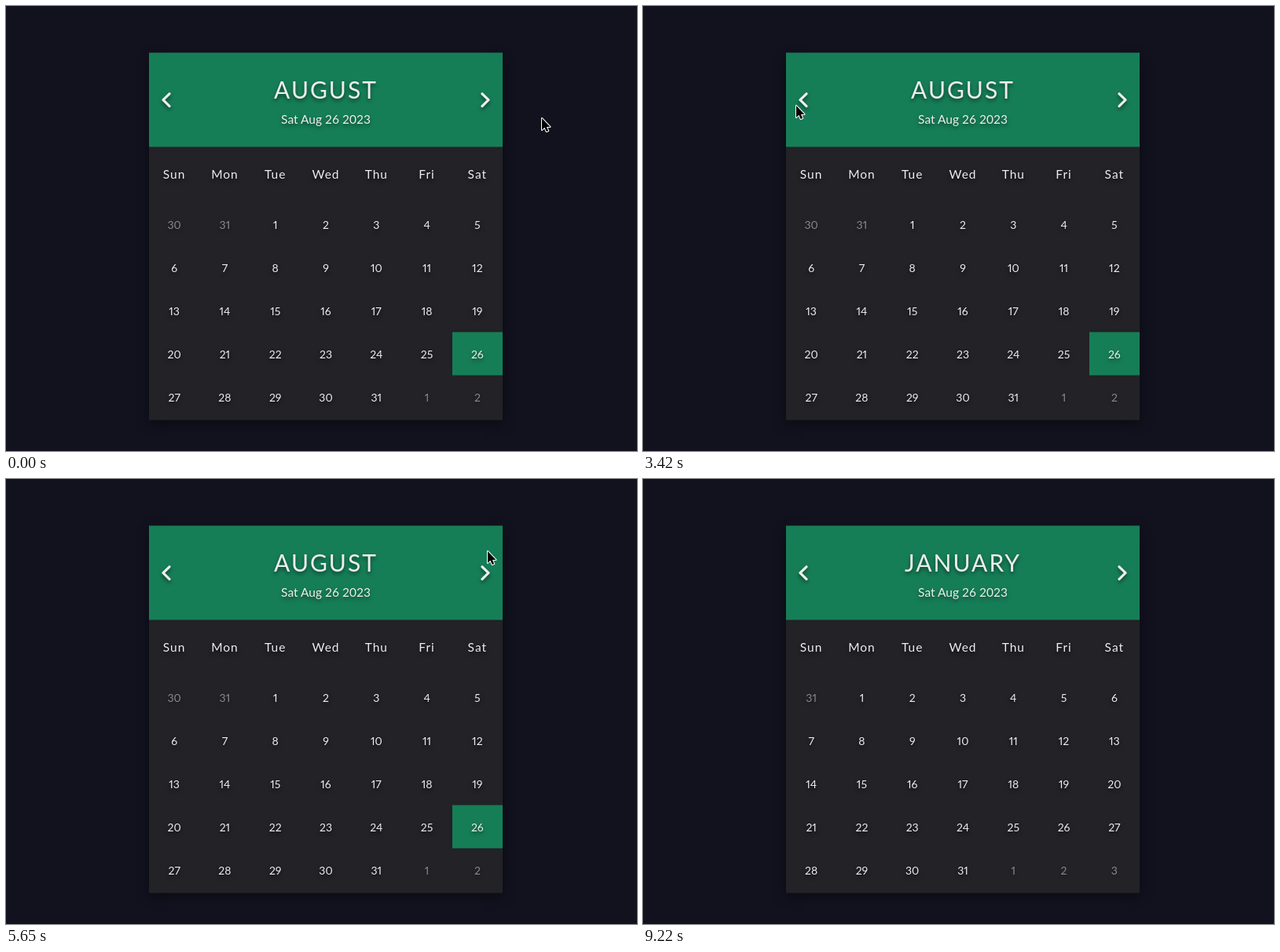
An HTML page that plays this animation: 803x567 px, repeating every 9.82 s.

```html
<!DOCTYPE html>
<html lang="en">
<head>
<meta charset="utf-8">
<title>Calendar</title>
<style>
  html, body { margin: 0; width: 100%; height: 100%; overflow: hidden; background: #12121f; }
  body { position: relative; font: 15.5px Lato, "Open Sans", sans-serif; color: #eee; }
  #calendar {
    position: absolute; left: 182px; top: 0; width: 450px;
    background: #222227; box-shadow: 0 5px 15px rgba(0, 0, 0, .4);
    text-shadow: 0 3px 5px rgba(0, 0, 0, .5);
  }
  header { position: relative; height: 120px; background: #167e56; text-align: center; }
  header div { position: absolute; width: 100%; line-height: 36px; }
  #title { top: 28px; font-size: 30px; letter-spacing: 2px; }
  #date { top: 66px; }
  header svg { position: absolute; left: 0; top: 0; filter: drop-shadow(0 3px 2.5px rgba(0, 0, 0, .5)); }
  .grid {
    position: absolute; left: 0; width: 100%;
    display: grid; grid-template-columns: repeat(7, 1fr); text-align: center;
  }
  #weekdays { top: 120px; line-height: 68px; letter-spacing: 1px; }
  #days { top: 191px; line-height: 55px; font-size: 14px; font-variant-numeric: proportional-nums; }
  .outside { opacity: .5; }
  .today { background: #167e56; }
  #pointer { position: absolute; left: 0; top: 0; }
</style>
</head>
<body>
<div id="calendar">
  <header>
    <svg width="450" height="120" fill="none" stroke="#eee" stroke-width="3.2" stroke-linecap="round" stroke-linejoin="round">
      <path d="M26 52.3 18 60.2 26 68.1M424 52.3 432 60.2 424 68.1"/>
    </svg>
    <div id="title"></div>
    <div id="date">Sat Aug 26 2023</div>
  </header>
  <div id="weekdays" class="grid"></div>
  <div id="days" class="grid"></div>
</div>
<svg id="pointer" width="803" height="567">
  <g id="cursor" stroke-linejoin="round"><path id="outline"/><path id="shape"/></g>
</svg>
<script>
const LOOP = 9820;
const MONTH_NAMES = ['JANUARY', 'FEBRUARY', 'MARCH', 'APRIL', 'MAY', 'JUNE', 'JULY',
  'AUGUST', 'SEPTEMBER', 'OCTOBER', 'NOVEMBER', 'DECEMBER'];

// [time, month index counted from January 2023]
const MONTHS = [[0, 7], [1640, 8], [2970, 7], [3570, 6], [5650, 7],
  [6400, 8], [6540, 9], [6840, 10], [6990, 11], [8330, 12]];

// [time, hotspot x, hotspot y, cursor kind]
const MOVES = [
  [0, 682, 143, 'arrow'], [150, 655, 120, 'arrow'], [300, 629, 103, 'arrow'],
  [600, 620, 109, 'arrow'], [750, 610, 118, 'hand'], [900, 607, 125, 'hand'],
  [1940, 585, 132, 'arrow'], [2090, 500, 139, 'arrow'], [2240, 390, 141, 'arrow'],
  [2380, 285, 137, 'arrow'], [2530, 215, 128, 'arrow'], [2680, 198, 125, 'hand'],
  [3270, 197, 126, 'hand'], [3420, 195, 127, 'arrow'],
  [3860, 225, 122, 'arrow'], [4010, 325, 115, 'arrow'], [4150, 455.5, 109, 'beam'],
  [4300, 540, 95, 'arrow'], [4450, 590, 83, 'arrow'], [4600, 611, 75, 'arrow'],
  [4750, 616, 74, 'arrow'], [4900, 618, 80, 'arrow'],
  [5050, 615, 88, 'hand'], [5200, 614, 93, 'hand'], [5650, 613, 92, 'arrow'],
  [5950, 610, 108, 'hand'], [6100, 607, 122, 'hand'],
  [6990, 607, 122, 'arrow'], [7130, 609, 119, 'arrow'],
  [7430, 610, 110, 'arrow'], [7580, 609, 101, 'hand'], [7730, 609, 97, 'hand'],
  [8330, 606, 95, 'arrow'], [8780, 622, 130, 'arrow'], [8930, 690, 275, 'arrow'],
  [9070, 781, 446, 'arrow'], [9220, 820, 560, 'arrow']
];

const CURSORS = {
  arrow: { path: 'M0 0V15L3.4 11.8 5.7 17 8.2 16 5.9 11H10.5Z', fill: '#000', edge: '#fff', width: 2 },
  hand: {
    path: 'M-3 2Q-1.5 0 0 1.6L1.2 5.6Q2.6 4.8 3.4 6 4.8 5.5 5.4 6.8 6.8 6.7 6.8 8.4V11L5.5 13.2V15.5H-1.8L-4.6 11.4-5.8 9.4Q-5 7.6-3.4 8.8L-1.6 9.6Z',
    fill: '#fff', edge: '#000', width: 2.2, details: 'M.6 11V13.5M2.4 11V13.5M4.2 11V13.5'
  },
  beam: {
    path: 'M-3-7.5H-1.2L0-6.5 1.2-7.5H3M0-6.5V6.5M-3 7.5H-1.2L0 6.5 1.2 7.5H3M-1.5 2.5H1.5',
    fill: 'none', edge: '#fff', width: 3, line: '#000'
  }
};

const el = id => document.getElementById(id);
const latest = (steps, time) => steps.findLast(step => step[0] <= time);

function setAttributes(node, attributes) {
  for (const [name, value] of Object.entries(attributes)) node.setAttribute(name, value);
}

function dayCell(date, month) {
  const outside = date.getMonth() !== month % 12;
  const today = date.getFullYear() === 2023 && date.getMonth() === 7 && date.getDate() === 26;
  const kind = outside ? 'outside' : today ? 'today' : '';
  return `<div class="${kind}">${date.getDate()}</div>`;
}

function showMonth(month) {
  const lead = new Date(2023, month, 1).getDay();
  const length = new Date(2023, month + 1, 0).getDate();
  const rows = Math.ceil((lead + length) / 7);
  const height = 193 + rows * 55;
  el('calendar').style.height = height + 'px';
  // A transform keeps the half-pixel edges soft.
  el('calendar').style.transform = `translateY(${293.5 - height / 2}px)`;
  el('title').textContent = MONTH_NAMES[month % 12];
  el('days').innerHTML = Array.from({ length: rows * 7 }, (_, i) =>
    dayCell(new Date(2023, month, i + 1 - lead), month)).join('');
}

function showCursor([, x, y, kind]) {
  const { path, fill, edge, width, line = 'none', details = '' } = CURSORS[kind];
  el('cursor').setAttribute('transform', `translate(${x} ${y})`);
  setAttributes(el('outline'), { d: path + details, fill: 'none', stroke: edge, 'stroke-width': width });
  setAttributes(el('shape'), { d: path, fill, stroke: line });
  if (details) setAttributes(el('outline'), { d: path });
}

let shownMonth, shownMove;
function draw(now) {
  const time = now % LOOP;
  const month = latest(MONTHS, time)[1];
  const move = latest(MOVES, time);
  if (month !== shownMonth) showMonth(shownMonth = month);
  if (move !== shownMove) showCursor(shownMove = move);
  requestAnimationFrame(draw);
}

el('weekdays').innerHTML = ['Sun', 'Mon', 'Tue', 'Wed', 'Thu', 'Fri', 'Sat']
  .map(name => `<div>${name}</div>`).join('');
draw(0);
</script>
</body>
</html>
```
